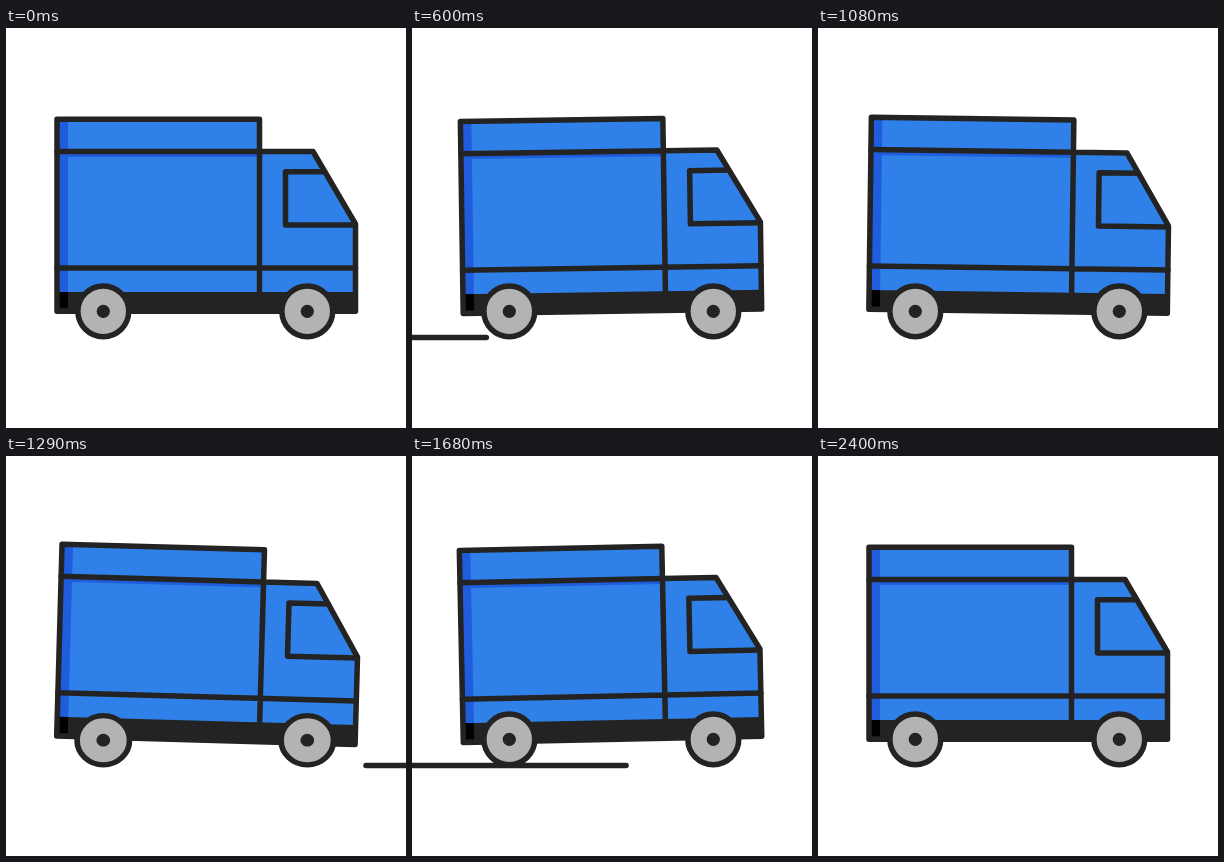
An HTML page for the animation above (4460 ms loop, 400 px wide and 400 px high).

```html
<!DOCTYPE html>
<html lang="en">
<head>
<meta charset="utf-8">
<title>Delivery truck</title>
<style>
  html, body { margin: 0; height: 100%; overflow: hidden; background: #fff; }
  svg { display: block; width: 100%; height: 100%; }
  .ink { stroke: #232323; stroke-width: 5.5; stroke-linecap: round; stroke-linejoin: round; }
</style>
</head>
<body>
<svg viewBox="0 0 400 400">
  <defs>
    <g id="wheel">
      <circle class="ink" r="25.4" fill="#b3b3b3"/>
      <circle r="6.6" fill="#232323"/>
    </g>
  </defs>
  <line id="road" class="ink" y1="309.6" y2="309.6"/>
  <g id="truck">
    <path fill="#2f80e8" d="M51 91.3H253.5V123.5H307L349.5 196V283.3H51Z"/>
    <path fill="#1f5ddd" d="M51 91.3H62V264H51ZM62 123.5H253.5V129H62Z"/>
    <path fill="#232323" d="M51 264H349.5V283.3H51Z"/>
    <path d="M51 264H62V280.5H51Z"/>
    <g class="ink" fill="none">
      <path d="M51 91.3H253.5V123.5H307L349.5 196V283.3H51Z"/>
      <path d="M51 123.5H253.5V264M51 240H349.5M318.5 143.8H279.5V197H349"/>
    </g>
  </g>
  <use class="wheel" href="#wheel"/>
  <use class="wheel" href="#wheel"/>
</svg>
<script>
const LOOP = 4460, DRIVE = 2400, STEP = 30;
const BOUNCE = 530, BOUNCES = 4;
const PASSES = [0, 1210];
// Tilt of the body: time in ms, degrees
const TILT = [[0, 0], [220, 1.6], [714, -1.2], [1295, 1.6], [1695, -1.2], [2400, 0]];

const truck = document.getElementById('truck');
const road = document.getElementById('road');
const wheels = document.querySelectorAll('.wheel');

function tiltAt(t) {
  const i = Math.max(1, TILT.findIndex(k => k[0] >= t));
  const [t0, a] = TILT[i - 1], [t1, b] = TILT[i];
  const u = (t - t0) / (t1 - t0);
  return a + (b - a) * (1 - Math.cos(Math.PI * u)) / 2;
}

function bounceAt(t) {
  return t < BOUNCE * BOUNCES ? Math.sin(Math.PI * t / BOUNCE) ** 4 : 0;
}

function drawRoad(t) {
  const p = t - (t < PASSES[1] ? PASSES[0] : PASSES[1]);
  // The front runs steadily, the tail speeds up behind it
  const front = Math.max(-20, 446 - 1.075 * p);
  const tail = 446 - 0.00097 * (p + 19) ** 2;
  road.setAttribute('x1', front);
  road.setAttribute('x2', Math.max(front, tail));
}

function draw(t) {
  const bounce = bounceAt(t);
  truck.setAttribute('transform', `translate(0 ${bounce}) rotate(${tiltAt(t)} 200 270)`);
  wheels.forEach((wheel, i) => {
    const x = i ? 301.3 : 97.3;
    wheel.setAttribute('transform',
      `translate(${x} ${283.3 + bounce}) scale(${1 + 0.035 * bounce} ${1 - 0.035 * bounce})`);
  });
  drawRoad(t);
}

const start = performance.now();
function frame() {
  const t = (performance.now() - start) % LOOP;
  draw(Math.min(DRIVE, Math.floor(t / STEP) * STEP));
  requestAnimationFrame(frame);
}
frame();
</script>
</body>
</html>
```
